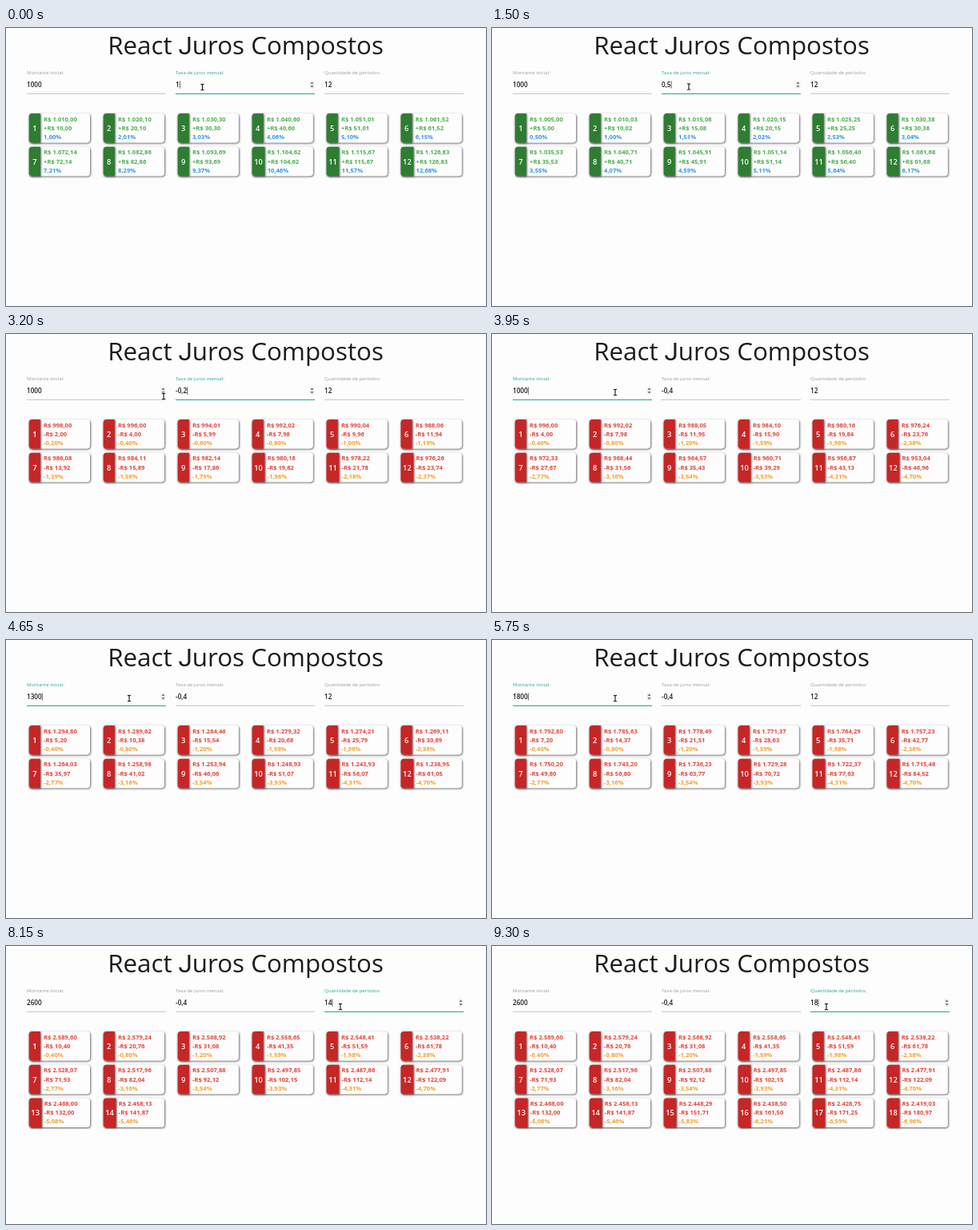
Write an HTML page that moves like this. It is 600 px wide and 348 px high and loops after 9.35 s.

```html
<!DOCTYPE html>
<html lang="pt-BR">
<head>
<meta charset="utf-8">
<title>React Juros Compostos</title>
<style>
  html, body { margin: 0; width: 100%; height: 100%; overflow: hidden; background: #fdfdfd; }
  svg { display: block; width: 100%; height: 100%; font-family: "Open Sans", "Noto Sans", sans-serif; }
  .title { font-size: 31.3px; fill: #1c1c1c; text-anchor: middle; }
  .title tspan { font-family: Roboto, sans-serif; }
  .label { font-size: 6.05px; fill: #9c9c9c; }
  .value { font-size: 8.2px; font-weight: 600; fill: #1a1a1a; }
  .line { fill: #a8a8a8; }
  .focus .label, .focus .line { fill: #26a69a; }
  .num { font-size: 9.3px; font-weight: 600; fill: #fff; text-anchor: middle; }
  .money { font-size: 7.6px; font-weight: 700; }
  .up .badge { fill: #2e7d32; }
  .down .badge { fill: #c62828; }
  .up .money { fill: #4caf50; }
  .down .money { fill: #e5443a; }
  .up .pct { fill: #2f95ea; }
  .down .pct { fill: #f5a02a; }
</style>
</head>
<body>
<svg viewBox="0 0 600 348">
  <defs>
    <filter id="shadow" x="-20%" y="-20%" width="150%" height="150%">
      <feDropShadow dx="0.8" dy="0.9" stdDeviation="0.9" flood-color="#333" flood-opacity="0.85"/>
    </filter>
    <path id="beam" d="M-2.1-3.8Q-.4-3.9 0-3.1Q.4-3.9 2.1-3.8M0-3.1V3.1M-2.1 3.8Q-.4 3.9 0 3.1Q.4 3.9 2.1 3.8"/>
  </defs>
  <text class="title" x="299.5" y="32.8">React <tspan>J</tspan>uros Compostos</text>
  <g id="fields"></g>
  <g id="cards"></g>
  <rect id="caret" y="66.4" width="0.7" height="9.2" fill="#222"/>
  <g id="mouse" fill="none">
    <use href="#beam" stroke="#fff" stroke-width="1.9"/>
    <use href="#beam" stroke="#111" stroke-width="1.1"/>
  </g>
</svg>
<script>
const LOOP = 9350;
const LABELS = ['Montante inicial:', 'Taxa de juros mensal:', 'Quantidade de períodos:'];
const FIELD = { x: 26, pitch: 186, width: 174 };

// Each field is stepped with the arrow keys at a steady pace.
const RATE = { start: 100, every: 245, count: 14 };
const AMOUNT = { start: 4020, every: 195, count: 16 };
const PERIODS = { start: 7600, every: 230, count: 6 };
const FOCUS = [3880, 7680];

// time, x, y
const PATH = [
  [0, 245.5, 74], [1000, 246, 73.5], [2950, 246, 73.5], [3200, 197, 78],
  [3550, 154, 73], [6550, 154, 73], [6800, 314.5, 73], [7050, 400, 75],
  [7300, 418, 76], [LOOP, 418, 76]
];

const $ = id => document.getElementById(id);
const fields = $('fields'), cards = $('cards'), caret = $('caret'), mouse = $('mouse');

const steps = (s, t) => Math.max(0, Math.min(s.count, Math.floor((t - s.start) / s.every)));
const fixed = n => Math.abs(n).toLocaleString('pt-BR', { minimumFractionDigits: 2, maximumFractionDigits: 2 });

function mouseAt(t) {
  let i = 1;
  while (i < PATH.length - 1 && PATH[i][0] < t) i++;
  const [t0, x0, y0] = PATH[i - 1], [t1, x1, y1] = PATH[i];
  const k = (t - t0) / (t1 - t0), e = k * k * (3 - 2 * k);
  return [x0 + (x1 - x0) * e, y0 + (y1 - y0) * e];
}

function stateAt(t) {
  const focus = FOCUS.filter(f => t >= f).length;
  const [mx, my] = mouseAt(t);
  const hover = LABELS.findIndex((_, i) => {
    const dx = mx - FIELD.x - i * FIELD.pitch;
    return dx >= 0 && dx <= FIELD.width;
  });
  const active = [RATE, AMOUNT, PERIODS][focus];
  const n = steps(active, t);
  const touched = n ? active.start + n * active.every : focus ? FOCUS[focus - 1] : 0;
  return {
    amount: 1000 + 100 * steps(AMOUNT, t),
    rate: (10 - steps(RATE, t)) / 10,
    periods: 12 + steps(PERIODS, t),
    focus: [1, 0, 2][focus],
    hover, mx, my,
    blink: Math.floor((t - touched) / 500) % 2 === 0
  };
}

function field(label, value, i, focused, spinner) {
  const x = FIELD.x + i * FIELD.pitch, sx = x + 170.5;
  const arrows = `<rect x="${sx - 3}" y="66.5" width="6" height="9" fill="#efefef"/>
    <path d="M${sx - 1.8} 69.8l1.8-2.2 1.8 2.2zM${sx - 1.8} 72.2l1.8 2.2 1.8-2.2z" fill="#555"/>`;
  return `<g class="${focused ? 'focus' : ''}">
    <text class="label" x="${x}" y="58.2">${label}</text>
    <text class="value" x="${x}" y="74">${value}</text>
    <rect class="line" x="${x}" y="81.8" width="${FIELD.width}" height="${focused ? 1.1 : 0.7}"/>
    ${spinner ? arrows : ''}</g>`;
}

function card(i, total, gain, amount) {
  const x = 28.7 + 92.95 * (i % 6), y = 107 + 41.8 * Math.floor(i / 6);
  const wide = i >= 9, w = wide ? 15.9 : 14.2;
  const tx = x + (wide ? 19.1 : 18.4);
  const down = gain < 0, sign = down ? '-' : '';
  const line = (n, text, cls = '') =>
    `<text class="money ${cls}" x="${tx}" y="${y + 9.6 + 11.1 * n}">${text}</text>`;
  return `<g class="${down ? 'down' : 'up'}">
    <rect x="${x}" y="${y}" width="76.3" height="36.4" rx="3.8" fill="#fdfdfd" filter="url(#shadow)"/>
    <path class="badge" filter="url(#shadow)" d="M${x + w} ${y}v36.4H${x + 3.8}a3.8 3.8 0 0 1-3.8-3.8v-28.8a3.8 3.8 0 0 1 3.8-3.8z"/>
    <text class="num" x="${x + w / 2}" y="${y + 21.8}">${i + 1}</text>
    ${line(0, 'R$ ' + fixed(total))}
    ${line(1, (sign || '+') + 'R$ ' + fixed(gain))}
    ${line(2, sign + fixed(gain / amount * 100) + '%', 'pct')}</g>`;
}

function drawFields(s) {
  const values = [s.amount, String(s.rate).replace('.', ','), s.periods];
  fields.innerHTML = LABELS.map((label, i) =>
    field(label, values[i], i, i === s.focus, i === s.focus || i === s.hover)).join('');
  const text = fields.querySelector('.focus .value');
  caret.setAttribute('x', FIELD.x + s.focus * FIELD.pitch + text.getComputedTextLength() + 0.2);
}

function drawCards({ amount, rate, periods }) {
  let total = amount, html = '';
  for (let i = 0; i < periods; i++) {
    total += total * rate / 100;
    html += card(i, total, total - amount, amount);
  }
  cards.innerHTML = html;
}

let fieldKey, cardKey;
function render(t) {
  const s = stateAt(t);
  const ck = [s.amount, s.rate, s.periods].join();
  const fk = [ck, s.focus, s.hover].join();
  if (fk !== fieldKey) drawFields(s);
  if (ck !== cardKey) drawCards(s);
  fieldKey = fk;
  cardKey = ck;
  caret.style.visibility = s.blink ? 'visible' : 'hidden';
  mouse.setAttribute('transform', `translate(${s.mx} ${s.my})`);
}

const begin = performance.now();
function tick() {
  render((performance.now() - begin) % LOOP);
  requestAnimationFrame(tick);
}
tick();
</script>
</body>
</html>
```
